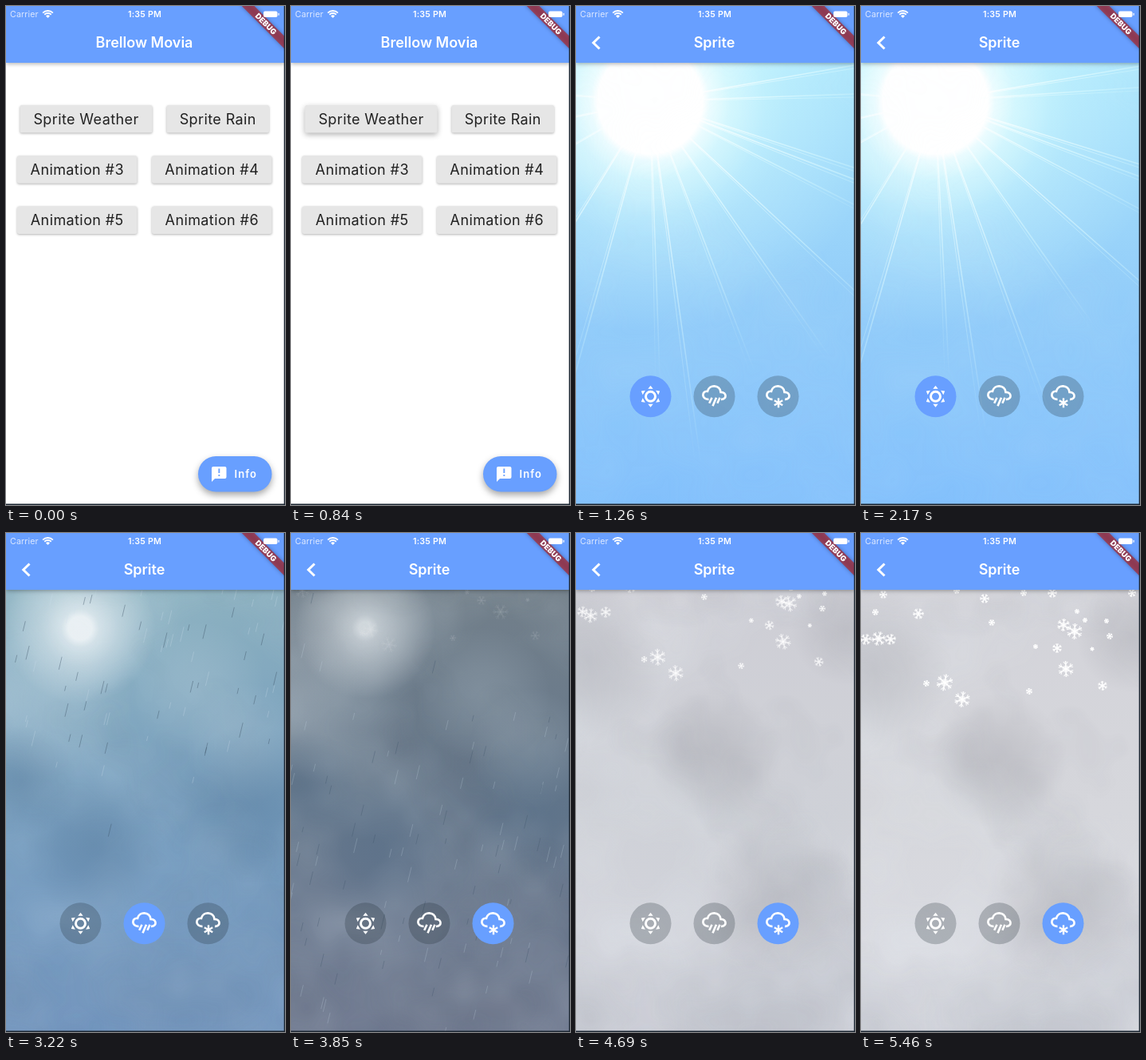
An HTML page with a canvas for the animation above (5530 ms loop, 350 by 624 pixels).

```html
<!DOCTYPE html>
<html lang="en">
<head>
<meta charset="utf-8">
<title>Weather sprites</title>
<style>
  html, body { margin: 0; width: 100%; height: 100%; overflow: hidden; background: #fff; }
  canvas { display: block; }
</style>
</head>
<body>
<canvas id="stage" width="350" height="624"></canvas>
<script>
const W = 350, H = 624, LOOP = 5530, STEP = 70;
const PUSH = 860, RAIN = 2720, SNOW = 3740;
const BLUE = '#689fff', SUN = { x: 93, y: 119 };
const ctx = document.getElementById('stage').getContext('2d');

const clamp = v => Math.max(0, Math.min(1, v));
const mix = (a, b, p) => a + (b - a) * p;
const progress = (t, from, span) => clamp((t - from) / span);

function seeded(seed) {
  return () => {
    seed = (seed + 0x6D2B79F5) | 0;
    let v = Math.imul(seed ^ (seed >>> 15), 1 | seed);
    v ^= v + Math.imul(v ^ (v >>> 7), 61 | v);
    return ((v ^ (v >>> 14)) >>> 0) / 4294967296;
  };
}

// Drawing helpers
function text(str, x, y, font, color = '#fff', align = 'center', spacing = 0) {
  ctx.font = font + ' Inter, sans-serif';
  ctx.letterSpacing = spacing + 'px';
  ctx.textAlign = align;
  ctx.textBaseline = 'alphabetic';
  ctx.fillStyle = color;
  ctx.fillText(str, x, y);
  ctx.letterSpacing = '0px';
}

function shadow(alpha = 0, blur = 0, dy = 0) {
  ctx.shadowColor = `rgba(0,0,0,${alpha})`;
  ctx.shadowBlur = blur;
  ctx.shadowOffsetY = dy;
}

function box(x, y, w, h, r, color) {
  ctx.fillStyle = color;
  ctx.beginPath();
  ctx.roundRect(x, y, w, h, r);
  ctx.fill();
}

function disc(x, y, r, color) {
  ctx.fillStyle = color;
  ctx.beginPath();
  ctx.arc(x, y, r, 0, 7);
  ctx.fill();
}

function line(width, color, ...pts) {
  ctx.lineWidth = width;
  ctx.strokeStyle = color;
  ctx.beginPath();
  pts.forEach(([x, y], i) => i ? ctx.lineTo(x, y) : ctx.moveTo(x, y));
  ctx.stroke();
}

function glow(x, y, r, rgb, stops) {
  const g = ctx.createRadialGradient(x, y, 0, x, y, r);
  stops.forEach(([at, a]) => g.addColorStop(clamp(at), `rgba(${rgb},${a})`));
  ctx.fillStyle = g;
  ctx.fillRect(x - r, y - r, 2 * r, 2 * r);
}

// Home page
function appBar(title) {
  shadow(0.3, 5, 1.5);
  box(0, 0, W, 71, 0, BLUE);
  shadow();
  text(title, 173.5, 52, '600 18px');
}

function button(label, x, y, w, lift = 0) {
  shadow(0.3, 3 + 4 * lift, 1 + 1.5 * lift);
  box(x, y, w, 34.5, 2.5, '#e6e6e6');
  shadow();
  text(label, x + w / 2, y + 23.5, '400 18px', '#212121', 'center', 0.4);
}

function home(t) {
  box(0, 0, W, H, 0, '#fff');
  appBar('Brellow Movia');
  button('Sprite Weather', 17.5, 124, 166, progress(t, 600, 200));
  button('Sprite Rain', 201.5, 124, 128.5);
  for (let i = 0; i < 4; i++)
    button('Animation #' + (i + 3), i % 2 ? 183 : 14, i < 2 ? 187.3 : 250.6, 150.5);
  shadow(0.35, 8, 4);
  box(241, 563, 92.5, 44.5, 22.3, BLUE);
  shadow();
  box(258, 576, 18.5, 15, 2, '#fff');
  ctx.beginPath();
  ctx.moveTo(258, 585);
  ctx.lineTo(258, 595);
  ctx.lineTo(262.5, 590.5);
  ctx.fill();
  box(266.4, 578.5, 1.9, 5.6, 0, BLUE);
  box(266.4, 586, 1.9, 1.9, 0, BLUE);
  text('Info', 286.5, 589.8, '600 13px', '#fff', 'left', 1.1);
}

// Sky
const SKIES = [
  [[172, 230, 252], [148, 206, 249], [130, 192, 252]],
  [[102, 117, 128], [88, 108, 130], [96, 108, 134]],
  [[211, 211, 217], [214, 215, 220], [219, 220, 227]]
];

function cloudTile(seed, rgb) {
  const n = 128, tile = document.createElement('canvas');
  tile.width = tile.height = n;
  const pen = tile.getContext('2d'), img = pen.createImageData(n, n);
  const rnd = seeded(seed), sum = new Float32Array(n * n);
  const smooth = f => f * f * (3 - 2 * f);
  for (let cells = 4, amp = 0.5; cells <= 32; cells *= 2, amp /= 2) {
    const grid = Array.from({ length: cells * cells }, rnd);
    const at = (x, y) => grid[(y % cells) * cells + x % cells];
    for (let i = 0; i < n * n; i++) {
      const u = (i % n) * cells / n, v = Math.floor(i / n) * cells / n;
      const x = Math.floor(u), y = Math.floor(v), p = smooth(u - x), q = smooth(v - y);
      sum[i] += amp * mix(mix(at(x, y), at(x + 1, y), p), mix(at(x, y + 1), at(x + 1, y + 1), p), q);
    }
  }
  sum.forEach((s, i) => img.data.set([...rgb, 255 * clamp((s - 0.38) * 2.6)], i * 4));
  pen.putImageData(img, 0, 0);
  return tile;
}

const lightClouds = cloudTile(11, [235, 245, 250]);
const darkClouds = cloudTile(29, [70, 78, 92]);

function clouds(tile, alpha, shift) {
  ctx.globalAlpha = alpha;
  const size = 700, y = shift % size;
  ctx.drawImage(tile, -90, y, size, size);
  ctx.drawImage(tile, -90, y - size, size, size);
  ctx.globalAlpha = 1;
}

function puffs(list, rgb, alpha, dy) {
  if (alpha > 0)
    for (const [x, y, r] of list) glow(x, y + dy, r, rgb, [[0, alpha], [0.4, alpha * 0.7], [1, 0]]);
}

// Each ray: angle in degrees, drift in degrees per second
const RAYS = [
  [-10, 0.3], [-2, -2], [18, -1], [20.9, -0.8], [26.8, 1], [42.7, -1.6], [54.8, -0.2],
  [68.8, 1], [82, -0.8], [88, -1], [105.4, 0.6], [121.8, -0.6], [150, 1], [168, -1], [184, 1]
];

function sun(t) {
  const life = 1 - progress(t, RAIN, 2000);
  if (!life) return;
  const full = Math.pow(clamp((life - 0.7) / 0.3), 1.2);
  const a = Math.sqrt(life), core = 8 + 58 * full, outer = core + 80;
  glow(SUN.x, SUN.y, 290, '218,255,255', [[0, 0.95 * full], [0.3, 0.72 * full], [0.6, 0.3 * full], [1, 0]]);
  glow(SUN.x, SUN.y, outer, '255,255,255', [
    [0, a], [core / outer, a], [(core + 9) / outer, a * mix(0.72, 0.6, full)],
    [(core + 34) / outer, a * mix(0.42, 0.2, full)], [1, 0]
  ]);
  const rays = 1 - progress(t, RAIN, 400);
  if (!rays) return;
  RAYS.forEach(([deg, drift], i) => {
    const length = 400 + 60 * Math.sin(i * 2.4 + t / 900);
    for (const spread of [0, 0.9]) {
      const angle = (deg + spread + drift * (t - 1260) / 1000) * Math.PI / 180;
      const x = SUN.x + length * Math.cos(angle), y = SUN.y + length * Math.sin(angle);
      const g = ctx.createLinearGradient(SUN.x, SUN.y, x, y);
      g.addColorStop(0.15, `rgba(255,255,255,${0.75 * rays})`);
      g.addColorStop(0.6, `rgba(225,255,255,${0.4 * rays})`);
      g.addColorStop(1, 'rgba(225,255,255,0)');
      line(spread ? 0.8 : 1.5, g, [SUN.x, SUN.y], [x, y]);
    }
  });
}

const drops = (rnd => Array.from({ length: 130 }, () => ({
  x: rnd() * 480, speed: 260 + rnd() * 400, wait: rnd() * 1.2, size: 6 + rnd() * 13, light: rnd() < 0.45
})))(seeded(5));

function rain(t) {
  const alpha = progress(t, RAIN, 500) * (1 - progress(t, SNOW, 500));
  if (!alpha) return;
  for (const d of drops) {
    const age = (t - RAIN) / 1000 - d.wait * 0.5;
    if (age < 0) continue;
    const fall = age * d.speed % 600, x = d.x - fall * 0.24, y = 50 + fall;
    const color = d.light ? `rgba(205,222,235,${alpha * 0.3})` : `rgba(62,84,104,${alpha * 0.42})`;
    line(1, color, [x, y], [x - d.size * 0.24, y + d.size]);
  }
}

// Late position and radius of each flake
const FLAKES = [
  [155, 82, 6], [72, 101, 7], [18, 99, 4], [6, 133, 7], [22, 132, 9], [37, 133, 7], [82, 188, 4],
  [105, 187, 10.5], [127, 208, 10], [254, 115, 8], [268, 123, 10], [246, 144, 6], [257, 170, 10],
  [303, 191, 6], [211, 198, 4], [219, 142, 3], [290, 145, 2.5], [312, 129, 4], [271, 98, 3],
  [308, 110, 3], [281, 109, 3], [164, 112, 4], [28, 77, 5], [240, 75, 6], [120, 72, 4], [204, 75, 4],
  [340, 75, 5]
];

function snow(t) {
  const alpha = progress(t, SNOW, 1400);
  if (!alpha) return;
  ctx.globalAlpha = 0.92 * alpha;
  FLAKES.forEach(([x, y, r], i) => {
    const age = (t - 5460) / 1000;
    ctx.save();
    ctx.translate(x + age * 5 * Math.sin(i * 1.9), y + age * (41 + 4 * Math.sin(i * 2.7)));
    ctx.rotate(i + age * 0.3);
    disc(0, 0, r * 0.45, 'rgba(255,255,255,.65)');
    for (let k = 0; k < 6; k++) {
      ctx.rotate(Math.PI / 3);
      line(Math.max(1.1, r * 0.16), '#fff', [0, 0], [r, 0]);
      line(1, '#fff', [r * 0.9, -r * 0.28], [r * 0.58, 0], [r * 0.9, r * 0.28]);
    }
    ctx.restore();
  });
  ctx.globalAlpha = 1;
}

function sky(t) {
  const wet = progress(t, RAIN, 1000), white = progress(t, SNOW, 1000);
  const g = ctx.createLinearGradient(0, 72, 0, H);
  for (let i = 0; i < 3; i++) {
    const rgb = SKIES[0][i].map((c, k) => mix(mix(c, SKIES[1][i][k], wet), SKIES[2][i][k], white));
    g.addColorStop(i / 2, `rgb(${rgb})`);
  }
  ctx.fillStyle = g;
  ctx.fillRect(0, 0, W, H);
  sun(t);
  clouds(darkClouds, 0.22 * wet - 0.06 * white, t * 0.017);
  clouds(lightClouds, 0.11 + 0.15 * wet, t * 0.012);
  const storm = Math.min(1, wet * 2) * (1 - white);
  puffs([[60, 210, 100], [240, 195, 85], [300, 262, 75], [110, 90, 110]], '205,220,228', 0.22 * storm, (t - 3220) * 0.012);
  puffs([[310, 340, 100], [110, 390, 90], [20, 310, 70]], '66,98,130', 0.25 * storm, (t - 3220) * 0.012);
  puffs([[15, 170, 100], [172, 285, 85], [255, 465, 100], [340, 130, 70]], '130,130,138', 0.24 * white, (t - 5460) * 0.012);
  rain(t);
  snow(t);
}

// Weather switches
function cloudIcon() {
  ctx.lineWidth = 2.7;
  ctx.strokeStyle = '#fff';
  ctx.beginPath();
  ctx.moveTo(-7, 3.5);
  ctx.bezierCurveTo(-16.5, 4, -16, -7.5, -8.5, -6.5);
  ctx.bezierCurveTo(-6.5, -15.5, 7, -15, 8, -5.5);
  ctx.bezierCurveTo(16, -5.5, 16, 4, 8.5, 3.5);
  ctx.stroke();
}

const ICONS = [
  () => {
    ctx.lineWidth = 3;
    ctx.strokeStyle = ctx.fillStyle = '#fff';
    ctx.beginPath();
    ctx.arc(0, 0, 6, 0, 7);
    ctx.stroke();
    for (let i = 0; i < 6; i++) {
      ctx.rotate(Math.PI / 3);
      ctx.beginPath();
      ctx.moveTo(0, -13.5);
      ctx.lineTo(-3.2, -9.5);
      ctx.lineTo(3.2, -9.5);
      ctx.fill();
    }
  },
  () => {
    cloudIcon();
    line(2.6, '#fff', [-3, 1.5], [-6.3, 8.5]);
    line(2.6, '#fff', [2.5, 1.5], [-2, 12]);
    line(2.6, '#fff', [7, 1.5], [3.8, 8.5]);
  },
  () => {
    cloudIcon();
    ctx.translate(0.5, 8);
    for (let i = 0; i < 3; i++) {
      line(2.4, '#fff', [0, -6], [0, 6]);
      ctx.rotate(Math.PI / 3);
    }
  }
];

function weatherPage(t) {
  ctx.save();
  ctx.beginPath();
  ctx.rect(0, 0, W, H);
  ctx.clip();
  sky(t);
  const chosen = t < RAIN ? 0 : t < SNOW ? 1 : 2;
  ICONS.forEach((icon, i) => {
    ctx.save();
    ctx.translate(93.5 + 80 * i, 488.3);
    disc(0, 0, 26, i === chosen ? BLUE : 'rgba(30,40,50,.25)');
    icon();
    ctx.restore();
  });
  appBar('Sprite');
  line(3, '#fff', [29.5, 38.5], [21.8, 46], [29.5, 53.5]);
  ctx.restore();
}

// Fixed chrome
function chrome() {
  ctx.save();
  ctx.translate(348.5, 0);
  ctx.rotate(Math.PI / 4);
  ctx.scale(0.933, 0.933);
  shadow(0.5, 5);
  box(-42, 28, 84, 12, 0, 'rgba(183,28,28,.63)');
  shadow();
  text('DEBUG', 0, 37.6, '900 10.2px');
  ctx.restore();

  text('Carrier', 5, 14.3, '400 10.7px', '#dbe7ff', 'left', 0.1);
  text('1:35 PM', 174, 14.3, '600 10.7px', '#fff', 'center', 0.2);
  for (const r of [3, 6, 9]) {
    ctx.lineWidth = r === 3 ? 3 : 1.8;
    ctx.strokeStyle = '#fff';
    ctx.beginPath();
    ctx.arc(52.5, 15, r - (r === 3 ? 1 : 0), -Math.PI * 0.75, -Math.PI * 0.25);
    ctx.stroke();
  }
  box(323, 6.5, 17.5, 7.5, 2, '#fff');
  box(341.5, 8.8, 1.2, 3, 0.6, '#fff');

  box(348.7, 0, 1.3, H, 0, '#1c2733');
  box(0, 622.5, W, 1.5, 0, '#1c2733');
}

function draw(t) {
  const p = 1 - Math.pow(1 - progress(t, PUSH, 400), 3);
  if (p < 1) {
    ctx.save();
    ctx.translate(-p * W / 3, 0);
    home(t);
    ctx.restore();
  }
  if (p > 0) {
    ctx.save();
    ctx.translate((1 - p) * W, 0);
    weatherPage(t);
    ctx.restore();
  }
  chrome();
}

ctx.lineCap = ctx.lineJoin = 'butt';
ctx.lineJoin = 'miter';
const start = performance.now();
function tick() {
  draw(Math.floor((performance.now() - start) % LOOP / STEP) * STEP);
  requestAnimationFrame(tick);
}
tick();
</script>
</body>
</html>
```
